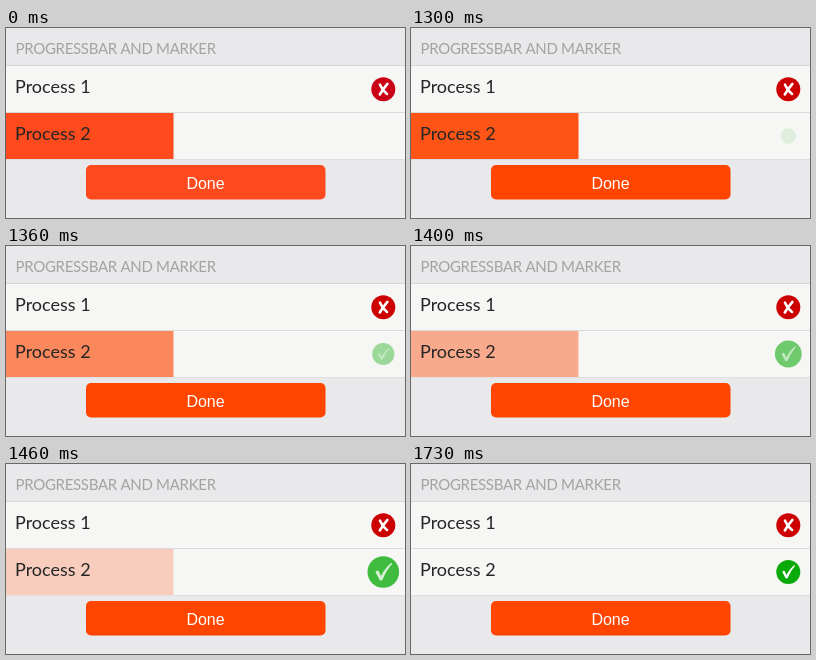
Write an HTML page with a canvas that moves like this. It is 399 by 190 pixels and loops after 3000 ms.

```html
<!DOCTYPE html>
<html lang="en">
<head>
<meta charset="utf-8">
<title>Progressbar and marker</title>
<style>
html, body { margin: 0; width: 100%; height: 100%; overflow: hidden; background: #e9e9eb; }
canvas { display: block; width: 399px; height: 190px; }
</style>
</head>
<body>
<canvas id="stage"></canvas>
<script>
const W = 399, H = 190, LOOP = 3000;
const PRESS = 1130, FADE = 1258, FADE_MS = 430, SHRINK = 1632, SHRINK_MS = 100;
const canvas = document.getElementById('stage');
const ctx = canvas.getContext('2d');
const dpr = window.devicePixelRatio || 1;
canvas.width = W * dpr;
canvas.height = H * dpr;

const crossA = new Path2D('M4.1 -5.3Q0 -.5 -3.5 5.3');
const crossB = new Path2D('M-3.3 -4.5Q-1 1 3.7 4.7');
const tick = new Path2D('M-6 0Q-4.5 -2 -3.4 -.5L-1.8 3Q2 -4 6.3 -7L6.8 -6.3Q2.5 -1.5 -.7 6Q-2 7 -2.8 6Z');

const clamp = v => Math.min(1, Math.max(0, v));

// Cubic bezier (.25, .1, .25, 1), solved for time by bisection
function ease(x) {
  x = clamp(x);
  if (x === 0 || x === 1) return x;
  const curve = (s, a, b) => 3 * (1 - s) * (1 - s) * s * a + 3 * (1 - s) * s * s * b + s * s * s;
  let lo = 0, hi = 1;
  for (let i = 0; i < 24; i++) {
    const mid = (lo + hi) / 2;
    if (curve(mid, .25, .25) < x) lo = mid; else hi = mid;
  }
  return curve(lo, .1, 1);
}

function box(x, y, w, h, color) {
  ctx.fillStyle = color;
  ctx.fillRect(x, y, w, h);
}

function disc(x, y, r, color) {
  ctx.fillStyle = color;
  ctx.beginPath();
  ctx.arc(x, y, r, 0, Math.PI * 2);
  ctx.fill();
}

function label(str, x, y, font, color, spacing = '0px', align = 'left') {
  ctx.font = font;
  ctx.letterSpacing = spacing;
  ctx.textAlign = align;
  ctx.fillStyle = color;
  ctx.fillText(str, x, y);
}

function drawCross(color) {
  ctx.save();
  ctx.translate(377.3, 61.2);
  disc(0, 0, 12, color);
  ctx.strokeStyle = '#fff';
  ctx.lineCap = 'round';
  ctx.lineWidth = 2.6;
  ctx.stroke(crossA);
  ctx.stroke(crossB);
  ctx.restore();
}

function drawTick(alpha, radius) {
  if (alpha <= 0) return;
  ctx.save();
  ctx.globalAlpha = alpha;
  ctx.translate(377.3, 108);
  ctx.scale(radius / 12, radius / 12);
  disc(0, 0, 12, '#0aaa0a');
  ctx.fillStyle = '#fff';
  ctx.fill(tick);
  ctx.restore();
}

function draw(t) {
  const pressed = t >= PRESS;
  const orange = pressed ? '#ff4500' : '#ff4a1d';
  const done = ease((t - FADE) / FADE_MS);
  const grown = 6.5 + 12 * done;
  const radius = grown + (12 - grown) * ease((t - SHRINK) / SHRINK_MS);

  ctx.setTransform(dpr, 0, 0, dpr, 0, 0);
  box(0, 0, W, H, '#e9e9eb');
  box(0, 38, W, 93, '#f6f6f4');
  box(0, 37, W, 1, '#d6d6d7');
  box(0, 84, W, 1, '#dadada');
  box(0, 131, W, 1, '#dfdfe1');

  ctx.globalAlpha = 1 - done;
  box(0, 85, 167.5, 46, orange);
  ctx.globalAlpha = 1;

  label('PROGRESSBAR AND MARKER', 9.5, 26, '15px Lato, sans-serif', '#a3a3a3', '-0.3px');
  label('Process 1', 9, 65, '18px Lato, sans-serif', '#262626');
  label('Process 2', 9, 112, '18px Lato, sans-serif', '#262626');
  drawCross(pressed ? '#cc0000' : '#c90016');
  drawTick(done, radius);

  ctx.fillStyle = orange;
  ctx.beginPath();
  ctx.roundRect(80, 137, 239.5, 34.5, 5);
  ctx.fill();
  label('Done', 199.5, 161, '16px "Liberation Sans", Arial, sans-serif', '#fff', '0px', 'center');

  if (pressed) {
    const touch = 1 - clamp((t - PRESS - 30) / 100);
    if (touch > 0) disc(200.5, 154, 12, `rgba(35, 30, 28, ${0.6 * touch})`);
  }
}

const start = performance.now();
function tickFrame() {
  draw((performance.now() - start) % LOOP);
  requestAnimationFrame(tickFrame);
}
tickFrame();
</script>
</body>
</html>
```
